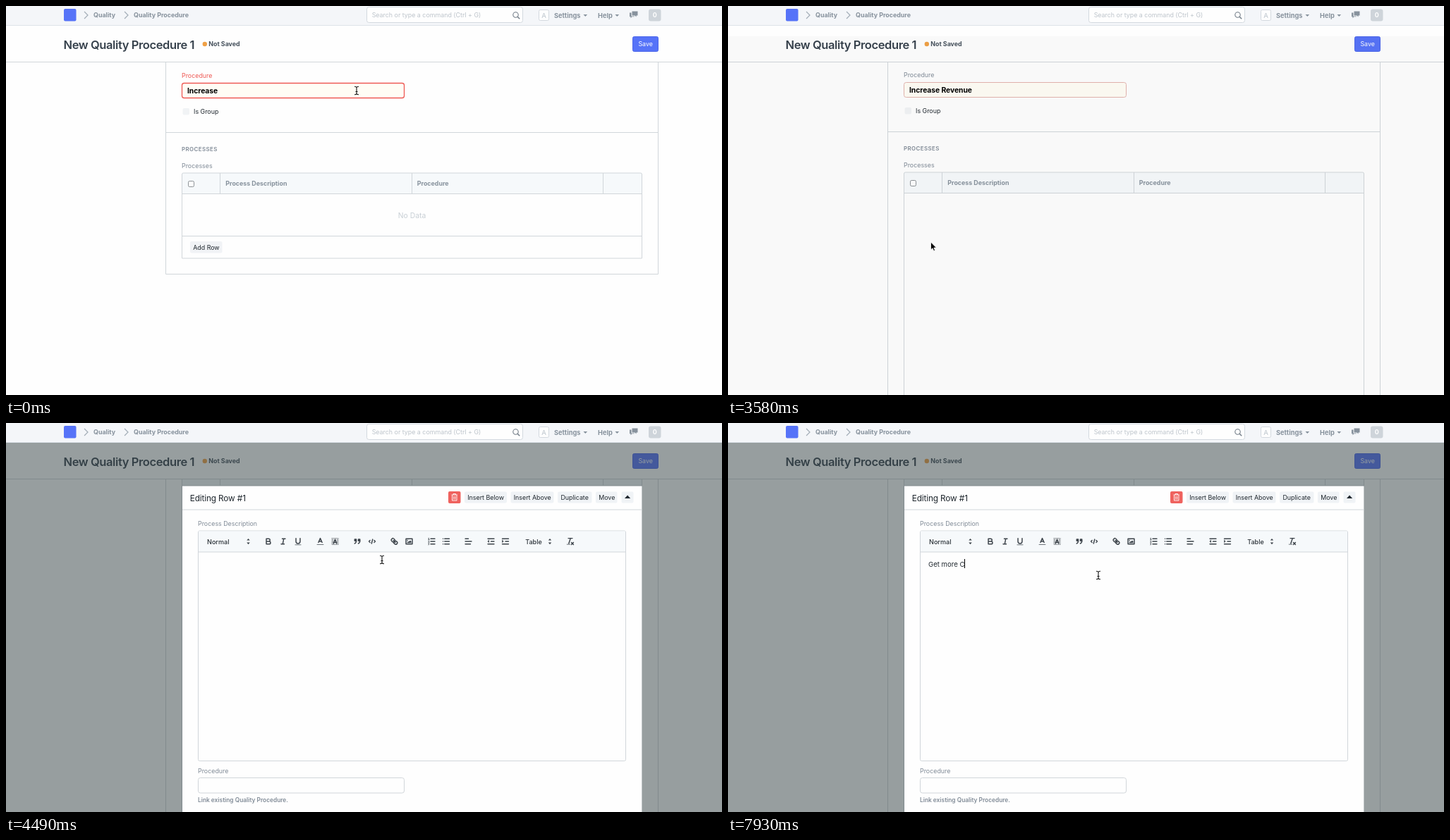
Write an HTML page that moves like this. It is 1015 by 552 pixels and loops after 8000 ms.

```html
<!DOCTYPE html>
<html lang="en">
<head>
<meta charset="utf-8">
<title>New Quality Procedure</title>
<style>
html, body { margin: 0; width: 100%; height: 100%; overflow: hidden; background: #fefefe; }
svg { display: block; width: 100%; height: 100%; }
text { font-family: Inter, "Open Sans", sans-serif; font-optical-sizing: none; white-space: pre; }
.icon { fill: none; stroke: #3d444b; stroke-width: 2; stroke-linecap: round; stroke-linejoin: round; }
.icon .solid { fill: #3d444b; }
.icon .flat { fill: #3d444b; stroke: none; }
.icon .thin { stroke-width: 1; }
</style>
</head>
<body>
<svg id="stage" viewBox="0 0 1015 552"></svg>
<script>
const LOOP = 8000;
const GREY = '#808b97', MUTED = '#87929d', DARK = '#1f272e', LINE = '#d1d6da', RED = '#ee5a55', BLUE = '#5673f8';
const PAPER = '#fefefe';

// Text is placed by its left edge and the middle of its capitals.
const text = (x, mid, str, size = 8.87, fill = DARK, weight = 400, extra = '') =>
  `<text x="${x}" y="${(mid + size * 0.364).toFixed(2)}" font-size="${size}" fill="${fill}" font-weight="${weight}" ${extra}>${str}</text>`;
const box = (x1, y1, x2, y2, fill, stroke = 'none', r = 0, extra = '') =>
  `<rect x="${x1}" y="${y1}" width="${x2 - x1}" height="${y2 - y1}" rx="${r}" fill="${fill}" stroke="${stroke}" ${extra}/>`;
const path = (d, stroke, width = 1, fill = 'none', extra = '') =>
  `<path d="${d}" stroke="${stroke}" stroke-width="${width}" fill="${fill}" ${extra}/>`;
const button = (x1, x2, label) => box(x1, 275, x2, 291, '#f0f3f6', 'none', 2) + text(x1 + 4.2, 283, label);

const NAV = () => [
  box(0, 0, 1015, 27.5, '#f4f6f9'),
  path('M0 27.5H1015', '#dde3e9'),
  box(82, 4, 99.5, 21.5, BLUE, 'none', 2),
  path('M111 8l5 5-5 5M168 8l5 5-5 5', '#a3adb7', 1.2),
  text(124, 13.2, 'Quality', 8.87, MUTED, 700),
  text(181, 13.2, 'Quality Procedure', 8.87, MUTED, 700),
  box(511.5, 1.5, 732.5, 23.5, PAPER, '#d3d9df', 3),
  text(518.7, 13.2, 'Search or type a command (Ctrl + G)', 8.87, '#bdc4cb'),
  '<circle cx="722.5" cy="12.5" r="3.7" fill="none" stroke="#6f7a85" stroke-width="1.1"/>',
  path('M725.2 15.2l3 3', '#6f7a85', 1.4),
  box(755.5, 5.5, 769.5, 20.5, PAPER, '#d3d9df', 2),
  text(762.5, 13.2, 'A', 9.6, '#bcc4cc', 400, 'text-anchor="middle"'),
  text(777, 13.2, 'Settings', 9.25, MUTED, 700),
  text(839, 13.2, 'Help', 9.25, MUTED, 700),
  path('M818.5 12h5.6l-2.8 3zM863.5 12h5.6l-2.8 3z', 'none', 0, MUTED),
  path('M887.5 7.5H895.5V13.5H893.5V15.5L891.5 13.5H887.5Z', 'none', 0, MUTED),
  path('M884 9.5H886.5V14.5H891L890.5 15.3H887.5L885.5 17.3V15.3H884Z', 'none', 0, MUTED),
  box(911, 4.5, 928.5, 21.5, '#ced4da', 'none', 3),
  text(919.8, 13.2, '0', 8.87, '#fff', 700, 'text-anchor="middle"'),
].join('');

const HEAD = () => [
  box(0, 28, 1015, 80, PAPER),
  path('M0 79.5H1015', LINE),
  text(81.5, 54.8, 'New Quality Procedure 1', 16.5, '#36414c', 600, 'letter-spacing="-.024em"'),
  '<circle cx="281.8" cy="54" r="3.2" fill="#f0a146"/>',
  text(287.3, 54, 'Not Saved', 8.87, '#46515c', 700),
  box(888.5, 43.5, 924.5, 64.5, BLUE, '#4b66ea', 2),
  text(896.4, 54, 'Save', 8.87, '#fff'),
].join('');

const FORM = () => [
  path('', LINE, 1, 'none', 'id="card"'),
  path('M226.5 179.5H924.5', LINE),
  `<g id="label">${text(249, 98.9, 'Procedure', 8.87, 'inherit')}</g>`,
  box(249.5, 109.5, 564.5, 130.5, '#fffdf5', RED, 3, 'id="field"'),
  text(257, 119.8, '', 10.35, '#000', 700, 'id="name" letter-spacing="-.006em"'),
  box(0, 113, 1, 126, '#000', 'none', 0, 'id="nameCaret"'),
  box(250.5, 145, 260, 154.5, '#f1f3f5', 'none', 2),
  text(266, 150, 'Is Group'),
  text(249, 203.3, 'PROCESSES', 7.9, GREY, 600, 'letter-spacing=".4"'),
  text(249, 226.8, 'Processes', 8.87, GREY),
  box(249.5, 237, 901.5, 266.5, '#f6f9fb'),
  path('M303.5 237V266M575.5 237V266M846.5 237V266M249.5 266.5H901.5', LINE),
  path('', LINE, 1, 'none', 'id="grid"'),
  box(258.5, 248.5, 266.5, 256.5, '#fff', '#8b9094', 1.8),
  text(311.3, 252, 'Process Description', 8.87, MUTED, 700),
  text(582.8, 252, 'Procedure', 8.87, MUTED, 700),
  '<g id="empty">',
  text(575.5, 297.2, 'No Data', 10.35, '#c8cfd5', 400, 'text-anchor="middle"'),
  path('M249.5 326.5H901.5', LINE),
  box(261, 334, 306.5, 350.5, '#f1f3f6', 'none', 2, 'id="addRow"'),
  text(265.2, 342.6, 'Add Row'),
  '</g>',
].join('');

// Toolbar icons on an 18 unit square, keyed by the middle of each on the stage.
const SORT = '<path class="flat" d="M6 11l3 3.500 3-3.500zM6 7l3-3.500 3 3.500z"/>';
const ICONS = {
  343.5: SORT,
  372: '<path d="M5 4H9.500A2.500 2.500 0 0 1 9.500 9H5ZM5 9H10.500A2.500 2.500 0 0 1 10.500 14H5Z"/>',
  393: '<path d="M7 4H13M5 14H11M8 14L10 4"/>',
  414: '<path d="M5 3V9a4 4 0 0 0 8 0V3"/><path class="flat" d="M3 15H15V16H3Z"/>',
  445.5: '<path class="thin" d="M3 15H15"/><path d="M5.500 11L9 3l3.500 8M11.600 9H6.400"/>',
  466.5: '<path class="thin" stroke-dasharray="1 2" d="M3 3H15V15H3ZM5 5V13M13 5V13"/><path d="M6 13L9 5l3 8M11.200 11H6.800"/>',
  498: '<path class="solid" d="M4 5H7V8H4ZM11 5h3V8H11Z"/><path d="M7 8c0 4-3 5-3 5M14 8c0 4-3 5-3 5"/>',
  519: '<path d="M5 7L3 9l2 2M13 7l2 2-2 2M10 5L8 13"/>',
  550.5: '<path d="M7 7l4 4M8.900 4.600a3.500 3.500 0 0 1 .4 4.700A3.500 3.500 0 0 1 4.600 8.900C3.200 7.500 2 6.400 4.200 4.200S7.500 3.200 8.900 4.600ZM13.400 9.100a3.500 3.500 0 0 0-4.700-.4a3.500 3.500 0 0 0 .4 4.700c1.400 1.400 2.500 2.500 4.700.4S14.800 10.500 13.400 9.100Z"/>',
  571.5: '<path d="M3 4H15V14H3Z"/><path class="flat" d="M5 12V11L7 9l1 1 3-3 2 2v3ZM5 6h2v2H5Z"/>',
  603.5: '<path d="M7 4H15M7 9H15M7 14H15"/><path class="thin" d="M2.500 3l1-.5V5.500M2.500 5.500h2M2.500 8c2-1 2.500.5 0 2.500h2M2.500 12.500h1.500l-.5 1.500q1.500 1.500-1 1.500"/>',
  624: '<path d="M6 4H15M6 9H15M6 14H15M3 4h0M3 9h0M3 14h0"/>',
  655.5: '<path d="M3 9H15M3 14H13M3 4H9"/>',
  687.5: '<path d="M3 14H15M3 4H15M9 9H15"/><path class="solid thin" d="M5 7v4L3 9Z"/>',
  708: '<path d="M3 14H15M3 4H15M9 9H15"/><path class="solid thin" d="M3 7v4l2-2Z"/>',
  771: SORT,
  800: '<path d="M5 3H13M6 13L9.400 3M11 11l4 4M15 11l-4 4"/><path class="flat" d="M2 14H9V15H2Z"/>',
};
const toolbarIcons = () => Object.entries(ICONS).map(([x, shape]) =>
  `<g class="icon" transform="translate(${x - 6.66} 338.900) scale(.74)">${shape}</g>`).join('');

const DIALOG = () => [
  box(250, 267, 901.5, 900, PAPER),
  text(260.7, 284, 'Editing Row #1', 11.8, DARK, 400, 'letter-spacing="-.011em"'),
  box(627, 274.5, 644.5, 291.5, '#ef625e', 'none', 2),
  path('M631.500 279.500H640M634 279.500V278H637.500V279.500M632.500 280V287.500H639V280M634.700 281.500V286M636.800 281.500V286', '#fff', 0.9),
  button(650, 710, 'Insert Below'),
  button(715.5, 776.5, 'Insert Above'),
  button(782.2, 830.5, 'Duplicate'),
  button(836, 866.5, 'Move'),
  box(872.5, 275, 889.5, 291, '#f0f3f6', 'none', 2),
  path('M877 284.500h8.200l-4.100-4.500z', 'none', 0, DARK),
  path('M250 300.500H901.500', LINE),
  text(272, 320.2, 'Process Description', 8.87, GREY),
  box(272.5, 330.5, 878.5, 657, PAPER, LINE, 2),
  box(273, 331, 878, 360.5, '#f6f9fb'),
  path('M272.500 360.500H878.500', LINE),
  text(285, 346, 'Normal', 9.1, '#2b3238', 500),
  text(736.3, 346, 'Table', 9, '#2b3238', 500),
  toolbarIcons(),
  text(284, 377.7, '', 9.6, DARK, 400, 'id="body"'),
  box(0, 370.5, 1, 383.5, '#000', 'none', 0, 'id="bodyCaret"'),
  text(272, 671.2, 'Procedure', 8.87, GREY),
  box(272.5, 681, 564.5, 702.5, PAPER, LINE, 3),
  text(272, 712, 'Link existing Quality Procedure.', 8.35, GREY, 600),
].join('');

const POINTERS =
  path('M0 0V11L2.500 8.700 4.200 12.500 6 11.700 4.400 8.100H7.900Z', '#fff', 0.8, '#000', 'id="arrow"') +
  path('M-3-5.800Q-.5-5.800 0-4.500Q.5-5.800 3-5.800M0-4.500V4.500M-3 5.800Q-.5 5.800 0 4.500Q.5 5.800 3 5.800M-1.500 1.500H1.500', '#111', 1.1, 'none', 'id="beam"');

document.getElementById('stage').innerHTML =
  `<g id="form">${FORM()}</g>${HEAD()}` +
  box(0, 28, 1015, 552, '#334143', 'none', 0, 'id="shade"') +
  `<g id="dialog">${DIALOG()}</g>${POINTERS}${NAV()}`;

const el = Object.fromEntries([...document.querySelectorAll('[id]')].map(e => [e.id, e]));
const set = (node, attrs) => { for (const key in attrs) node.setAttribute(key, attrs[key]); };
const show = (node, on) => set(node, { visibility: on ? 'visible' : 'hidden' });
const at = (steps, t) => steps.filter(step => step[0] <= t).pop().slice(1);

const NAME = [[0, 8], [450, 10], [600, 11], [1200, 12], [1350, 13], [1500, 14], [1800, 15], [2100, 16]];
const NAME_CARET = [[0, false], [450, true], [2530, false], [3130, true], [3580, false]];
const BODY = [[0, 0], [6290, 1], [6440, 2], [6590, 4], [6890, 5], [7040, 7], [7180, 8], [7930, 10]];
const BODY_CARET = [[0, false], [4790, true], [5390, false], [5990, true], [7630, false], [7930, true]];
// time, scroll, shade opacity, shade top, dialog opacity
const VIEW = [[0, 0, 0, 28, 0], [3580, 1, 0.025, 43, 0], [3730, 62, 0.47, 28, 0.97], [3900, 171.5, 0.5, 28, 1], [4050, 177.5, 0.5, 28, 1]];
const POINTER = [
  [0, 'beam', 497, 120], [2530, 'arrow', 500, 170], [2680, 'arrow', 503, 274], [2830, 'arrow', 472, 342],
  [2980, 'arrow', 400, 367], [3130, 'arrow', 330, 358], [3280, 'arrow', 292, 342], [3430, 'arrow', 287.5, 335],
  [3730, 'beam', 418.5, 282.5], [3900, 'beam', 712, 245], [4050, 'beam', 630, 212], [4200, 'beam', 536, 185.5],
  [4490, 'beam', 533, 194], [4640, 'beam', 528, 208], [4790, 'beam', 525, 216],
];

function type(node, caret, str, on) {
  if (node.textContent !== str) node.textContent = str;
  const width = str ? node.getComputedTextLength() : 0;
  set(caret, { x: Math.floor(+node.getAttribute('x') + width) });
  show(caret, on);
}

function draw(t) {
  const [scroll, shade, shadeTop, dialog] = at(VIEW, t);
  const open = t >= 3580;
  const move = `translate(0 ${-scroll})`;
  set(el.form, { transform: move });
  set(el.dialog, { transform: move, opacity: dialog });
  set(el.shade, { opacity: shade, y: shadeTop, height: 552 - shadeTop });
  set(el.card, { d: `M226.5 60V${open ? 950 : 380.5}H924.5V60` });
  set(el.grid, { d: `M249.5 ${open ? 900 : 358}V239q0-2 2-2H899.5q2 0 2 2V${open ? 900 : 358}Z` });
  show(el.empty, !open);
  set(el.label, { fill: open ? GREY : RED });
  set(el.field, { stroke: open ? '#e3b3ad' : RED, 'stroke-width': open ? 1 : 1.3 });
  set(el.addRow, { fill: t >= 3280 ? '#e3e7eb' : '#f1f3f6' });

  type(el.name, el.nameCaret, 'Increase Revenue'.slice(0, at(NAME, t)[0]), at(NAME_CARET, t)[0]);
  type(el.body, el.bodyCaret, 'Get more C'.slice(0, at(BODY, t)[0]), at(BODY_CARET, t)[0]);

  const [kind, x, y] = at(POINTER, t);
  for (const name of ['arrow', 'beam']) {
    show(el[name], name === kind);
    set(el[name], { transform: `translate(${x} ${y})` });
  }
}

const start = performance.now();
function frame() {
  draw((performance.now() - start) % LOOP);
  requestAnimationFrame(frame);
}
frame();
</script>
</body>
</html>
```
